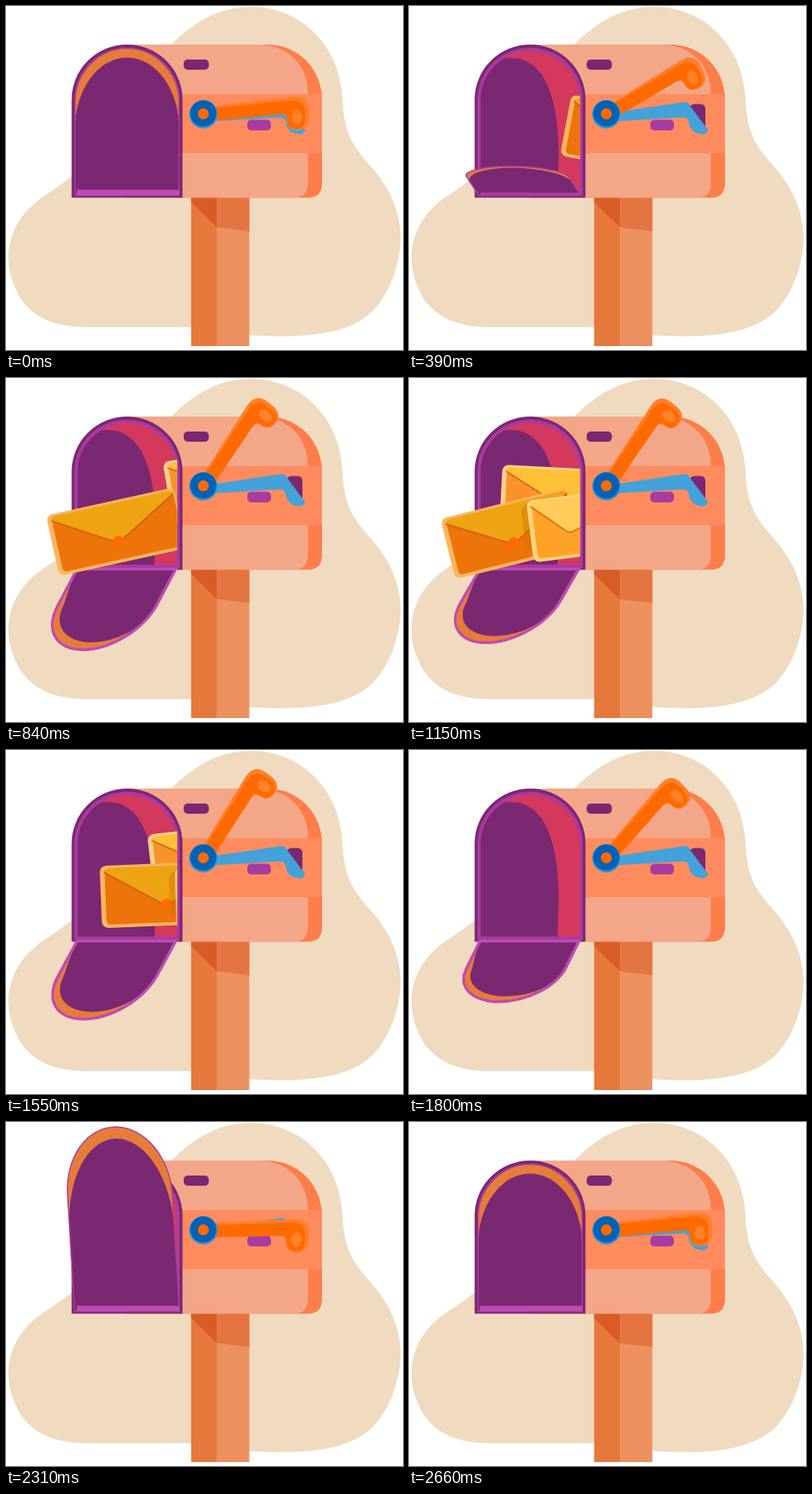
An HTML page with a canvas that plays this animation: 505x437 px, repeating every 3450 ms.

```html
<!DOCTYPE html>
<html lang="en">
<head>
<meta charset="utf-8">
<title>Mailbox</title>
<style>
  html, body { margin: 0; width: 100%; height: 100%; overflow: hidden; background: #fff; }
  canvas { display: block; }
</style>
</head>
<body>
<canvas id="stage" width="505" height="437"></canvas>
<script>
const ctx = document.getElementById('stage').getContext('2d');
const LOOP = 3450;
const PLUM = '#7b2873', MAGENTA = '#a83b9f', PINK = '#bf4ab5', RED = '#d4395d', RUST = '#e67c3a';

// Fast stretches step every 40 ms, the rest every 140 ms.
const BURSTS = [[0, 250], [530, 700], [840, 880], [1030, 1230], [1510, 1890], [2310, 2480], [2620, 2660]];

// Key poses: [time, values...]
const DOOR = [ // tip of the door relative to its hinge
  [0, 0, -188], [125, -15, -238], [390, -25, -38], [760, -56, 107], [1150, -56, 97],
  [1510, -56, 103], [1800, -39, 79], [2170, -20, -207], [2370, -12, -239], [2660, 0, -188]];
const FLAG = [ // degrees
  [0, 0], [170, 0], [390, -25], [700, -55], [880, -50], [1510, -51], [1640, -54],
  [1800, -42], [2030, -2], [2310, 4], [2660, 0]];

// Envelopes slide between two poses: x, y of the top left corner and degrees.
const ENVELOPES = [
  { edge: '#ffd08a', body: '#f7932a', flap: '#ffc035', tip: [80, 49],
    inside: [225, 106, -14], outside: [119, 110, 3], enter: [790, 1110], leave: [1270, 1660] },
  { edge: '#fdb55e', body: '#ec740b', flap: '#eea412', tip: [83, 52], seal: '#ff6b00',
    inside: [250, 95, 17], outside: [40, 179, -14], enter: [300, 980], leave: [1270, 1760] },
  { edge: '#ffd27a', body: '#ffa328', flap: '#ffcb59', tip: [52, 46], shade: 'rgba(205, 110, 0, .4)',
    inside: [235, 148, 0], outside: [149, 156, -7], enter: [920, 1130], leave: [1270, 1600] }
];

const clamp = x => Math.min(1, Math.max(0, x));
const mix = (a, b, p) => a + (b - a) * p;

function frameTime(now) {
  const [start, end] = BURSTS.filter(b => b[0] <= now).pop();
  const [from, step] = now < end ? [start, 40] : [end, 140];
  return from + Math.floor((now - from) / step) * step;
}

// Smooth curve through the key poses, without overshoot
function sample(keys, t) {
  const last = keys.length - 1;
  if (t >= keys[last][0]) return keys[last].slice(1);
  const i = keys.findIndex(k => k[0] > t) - 1;
  const a = keys[i], b = keys[i + 1], span = b[0] - a[0], s = (t - a[0]) / span;
  const slope = (n, c) => {
    if (n === 0 || n === last) return 0;
    const [p, q, r] = keys.slice(n - 1, n + 2);
    const before = (q[c] - p[c]) / (q[0] - p[0]), after = (r[c] - q[c]) / (r[0] - q[0]);
    return before * after <= 0 ? 0 : 2 * before * after / (before + after);
  };
  return a.slice(1).map((_, k) => {
    const c = k + 1;
    return mix(a[c], b[c], s * s * (3 - 2 * s))
      + span * s * (1 - s) * (slope(i, c) * (1 - s) - slope(i + 1, c) * s);
  });
}

function fill(color, path) {
  ctx.fillStyle = color;
  ctx.fill(new Path2D(path));
}

function disc(color, x, y, rx, ry = rx) {
  ctx.fillStyle = color;
  ctx.beginPath();
  ctx.ellipse(x, y, rx, ry, 0, 0, Math.PI * 2);
  ctx.fill();
}

function box(color, x, y, w, h, r = 0) {
  ctx.fillStyle = color;
  ctx.beginPath();
  ctx.roundRect(x, y, w, h, r);
  ctx.fill();
}

function backdrop() {
  box('#fff', 0, 0, 505, 437);
  fill('#f0dbc0', `M312 1 C375 1 425 50 428 118 C430 165 443 180 466 206
    C490 234 502 264 502 296 C501 330 488 366 465 389 C435 416 385 423 309 418
    L236 408 L100 408 C62 407 36 397 18 371 C7 351 3 336 3 318
    C4 285 22 260 46 243 Q68 229 84 216 L210 49 C240 20 270 1 312 1 Z`);
}

function post() {
  box('#e6783c', 235.5, 243, 32.5, 189);
  box('#ec9060', 268, 243, 41.5, 189);
  fill('#d95c26', 'M235.5 243 H268 V281 L235.5 249 Z');
  fill('#e47540', 'M268 243 H309.5 V286 L268 281 Z');
}

function body() {
  fill('#fc7e4a', 'M153 49 H332 C372 49 402 80 402 120 V225 Q402 243.5 384 243.5 H153 Z');
  fill('#f4a688', 'M153 49 H322 C360 50 384 76 384 112 H153 Z');
  fill('#f4a688', 'M153 187 H384 V225 Q384 243.5 366 243.5 H153 Z');
  box('#ff8b5e', 224, 112, 178, 75);
  box(PLUM, 226, 68, 32, 13, 5);
}

const archPath = (l, r, top, bottom) =>
  `M${l} ${bottom} V119 A${(r - l) / 2} ${119 - top} 0 0 1 ${r} 119 V${bottom} Z`;

function opening() {
  const hollow = archPath(91, 217.5, 57, 237);
  fill(PLUM, archPath(83.5, 224.5, 49, 243.5));
  fill(MAGENTA, archPath(87, 221, 53, 241.5));
  fill(RED, hollow);
  ctx.save();
  ctx.clip(new Path2D(hollow));
  fill(PLUM, 'M85 237 V50 L108 70 Q122 64 140 67 C176 75 190 125 190.5 185 L189 237 Z');
  ctx.restore();
}

function door([tipX, tipY]) {
  const open = clamp((tipY + 40) / 80);
  const halfWidth = 65.5 - 1.5 * tipY / 190;
  const hinged = (center, radius, spring, top) => {
    const p = new Path2D(), out = new Path2D();
    p.moveTo(-1, 0);
    p.lineTo(center - radius, spring);
    p.ellipse(center, spring, radius, top - spring, 0, Math.PI, 0, true);
    p.lineTo(1, 0);
    p.closePath();
    out.addPath(p, new DOMMatrix([halfWidth, 0, tipX, tipY, 154, 241]));
    return out;
  };
  const outer = hinged(0, 1, mix(0.63, 0.45, open), 1);
  const inner = hinged(0.07 * open, mix(0.99, 0.93, open), 0.45, mix(0.934, 0.895, open));
  ctx.save();
  ctx.clip(outer);
  ctx.fillStyle = RUST;
  ctx.fill(outer);
  ctx.fillStyle = PLUM;
  ctx.fill(inner);
  ctx.strokeStyle = open < 0.5 ? MAGENTA : PINK;
  ctx.lineWidth = mix(3, 7, open);
  ctx.stroke(outer);
  ctx.restore();
  if (tipY < -60) box(PINK, 90, 233.5, 131, 7);
  else box(MAGENTA, 91, 237, 127, 4);
}

function envelope(look, t) {
  const progress = ([from, to]) => clamp((t - from) / (to - from)) * Math.PI / 2;
  const out = Math.sin(progress(look.enter)) + Math.cos(progress(look.leave)) - 1;
  if (out <= 0) return;
  const [x, y, deg] = look.inside.map((v, i) => mix(v, look.outside[i], out));
  const w = 166, h = 79, [tx, ty] = look.tip;
  ctx.save();
  ctx.beginPath();
  ctx.rect(0, 0, 217.5, 437);
  ctx.clip();
  ctx.translate(x, y);
  ctx.rotate(deg * Math.PI / 180);
  if (look.shade) box(look.shade, -8, 4, w, h - 20, 10);
  box(look.edge, 0, 0, w, h, 8);
  box(look.body, 6, 4, w - 8, h - 8, 5);
  const flap = `M5 7 L${tx - 5} ${ty - 2} Q${tx} ${ty + 1} ${tx + 5} ${ty - 2} L${w - 3} 7`;
  ctx.strokeStyle = 'rgba(190, 80, 0, .55)';
  ctx.lineWidth = 4;
  ctx.stroke(new Path2D(flap));
  fill(look.flap, flap + ` L${w - 6} 3 H10 Z`);
  if (look.seal) disc(look.seal, tx, ty, 7);
  ctx.restore();
}

function flag(deg) {
  box(PLUM, 357, 124.5, 20, 32, 6);
  fill('#43a2d9', `M262 135 L350 122 Q354 121 357 126 L380 157 Q381 161 374 163
    Q358 162 356 148 Q355 141 348 141.5 L262 146.5 Z`);
  box(MAGENTA, 307, 144.5, 30, 13.5, 5);

  ctx.save();
  ctx.translate(251, 137);
  ctx.rotate(deg * Math.PI / 180);
  ctx.translate(-251, -137);
  fill('#ff7f27', `M260 128 L364 115.5 Q385 113 385.5 133 V143 Q384 157.5 371 157.5
    Q357 157 357 145 Q357 137 350 137.5 L260 146 Z`);
  fill('#ff6a00', `M260 130 L362 120 Q380 118 381 136 V143 Q380 156 370 156
    Q358 156 358 145 Q357 137 350 137.5 L260 146 Z`);
  disc('#ff8129', 370, 141.5, 6.5, 9.5);
  ctx.restore();

  disc('#2f93d3', 251, 137.5, 18);
  disc('#0061b5', 251, 136.5, 16.5);
  disc('#ff6a00', 251, 137, 7);
}

function draw(t) {
  backdrop();
  post();
  body();
  opening();
  flag(sample(FLAG, t)[0]);
  door(sample(DOOR, t));
  ENVELOPES.forEach(look => envelope(look, t));
}

const start = performance.now();
function tick() {
  draw(frameTime(Math.max(0, performance.now() - start) % LOOP));
  requestAnimationFrame(tick);
}
tick();
</script>
</body>
</html>
```
